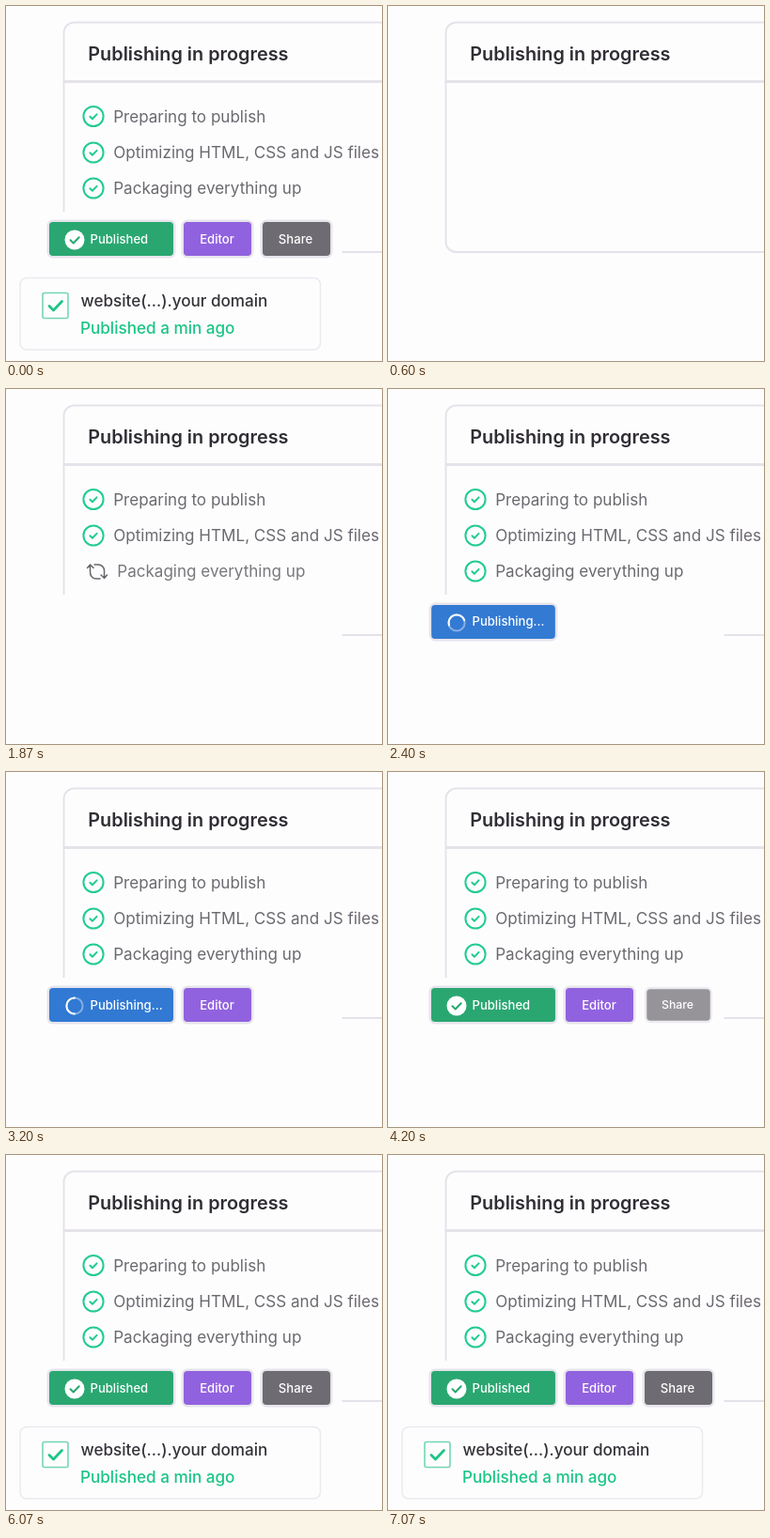
An HTML page that plays this animation: 400 px wide and 378 px high, repeating every 7.14 s.

```html
<!DOCTYPE html>
<html lang="en">
<head>
<meta charset="utf-8">
<title>Publishing in progress</title>
<style>
  html, body { margin: 0; width: 100%; height: 100%; overflow: hidden; background: #fefdfe; }
  svg { display: block; width: 400px; height: 378px; fill: none; font-family: Inter, "Open Sans", sans-serif; }
  path { stroke-linecap: round; stroke-linejoin: round; }
  .title { font-size: 19.85px; font-weight: 600; fill: #302e34; }
  .row text { font-size: 17.07px; fill: #6b696f; }
  .btn rect { stroke: #e6e5ec; stroke-width: 5; paint-order: stroke; }
  .btn text { font-size: 13.1px; font-weight: 500; fill: #fff; }
  .site text { font-size: 17.12px; font-weight: 500; fill: #353339; }
  .site .note { fill: #1bc586; }
</style>
</head>
<body>
<svg viewBox="0 0 400 378">
  <g stroke="#e5e3e9">
    <rect x="61.5" y="17.5" width="380" height="244.5" rx="11" stroke-width="2"/>
    <path d="M62 80.5H400" stroke-width="3"/>
  </g>
  <text class="title" x="87.3" y="58">Publishing in progress</text>

  <g id="rows"></g>
  <rect id="strip" x="32" y="219" width="325.5" height="57" fill="#fefdfe"/>

  <g id="publish" class="btn">
    <rect id="face" x="46" y="230" width="132" height="36" rx="4"/>
    <g id="busy">
      <g stroke="#fff" stroke-width="2">
        <circle cx="73" cy="249" r="8.6" stroke-opacity=".4"/>
        <path id="arc" d="M73 257.6A8.6 8.6 0 0 1 73 240.4"/>
      </g>
      <text x="89.5" y="252.5">Publishing...</text>
    </g>
    <g id="ready">
      <circle cx="73" cy="249" r="10.5" fill="#fff"/>
      <path d="M68.5 249.3l3.2 3.2 6-6.2" stroke="#2aa771" stroke-width="2"/>
      <text x="89.5" y="252.5">Published</text>
    </g>
  </g>
  <g id="editor" class="btn">
    <rect x="189" y="230" width="72" height="36" rx="4" fill="#9162df"/>
    <text x="224.5" y="252.5" text-anchor="middle">Editor</text>
  </g>
  <g id="share" class="btn">
    <rect x="273" y="230" width="72" height="36" rx="4" fill="#6e6b72"/>
    <text x="308" y="252.5" text-anchor="middle">Share</text>
  </g>

  <g id="site" class="site">
    <rect x="15" y="289.5" width="319.5" height="76.5" rx="7" fill="#fefdfe" stroke="#ebeaef" stroke-width="1.5"/>
    <rect x="39" y="305.5" width="27" height="27" rx="2" stroke="#72d8b0" stroke-width="1.6"/>
    <path d="M46 319.5l4.5 4.5 9-9.5" stroke="#1fc487" stroke-width="2.8"/>
    <text x="79.5" y="320">website(...).your domain</text>
    <text class="note" x="79" y="349">Published a min ago</text>
  </g>
</svg>
<script>
const LOOP = 7140, CLEAR = 70;
const $ = id => document.getElementById(id);

const rows = [
  { text: "Preparing to publish", y: 117.5, start: 650, done: 0 },
  { text: "Optimizing HTML, CSS and JS files", y: 156, start: 1120, done: 0 },
  { text: "Packaging everything up", y: 194, start: 1595, done: 2130 },
];

$("rows").innerHTML = rows.map(r => `<g class="row">
  <g transform="translate(93 ${r.y})">
    <g class="check" stroke="#22cc90" stroke-width="2">
      <circle r="10.6"/><path d="M-3.6 .3l2.5 2.5 4.7-4.9"/>
    </g>
    <g class="sync" stroke="#59575d" stroke-width="1.5">
      <path d="M-3 -7H1A6.5 6.5 0 0 1 7.5 -.5V7M4 4l3.5 3.5L10.5 4"/>
      <path d="M3 8H-1A6.5 6.5 0 0 1 -7.5 1V-6.5M-10.5 -3.5l3 -3.5L-4 -3.5"/>
    </g>
  </g>
  <text x="114.2" y="${r.y + 6}">${r.text}</text></g>`).join("");
[...$("rows").children].forEach((el, i) => rows[i].el = el);

// Ease-out: the part of the way still to go
const left = (t, start, dur) => (1 - Math.min(1, Math.max(0, (t - start) / dur))) ** 3;
const show = (el, on) => el.style.display = on ? "" : "none";

function place(el, rest, transform) {
  el.setAttribute("opacity", 1 - rest);
  el.setAttribute("transform", transform);
}

function pop(el, t, start, cx, cy, shrink = .22) {
  const rest = left(t, start, 400);
  place(el, rest, `translate(${cx} ${cy}) scale(${1 - shrink * rest}) translate(${-cx} ${-cy})`);
}

function draw(now) {
  let t = now % LOOP;
  if (t < CLEAR) t = LOOP;

  for (const r of rows) {
    const rest = left(t, r.start, 500);
    place(r.el, rest, `translate(${45 * rest} 0)`);
    show(r.el.querySelector(".check"), t >= r.done);
    show(r.el.querySelector(".sync"), t < r.done);
  }

  const rest = left(t, 920, 580);
  place($("strip"), rest, `translate(0 ${58 * rest})`);

  pop($("publish"), t, 2090, 112, 248);
  pop($("editor"), t, 2560, 225, 248);
  pop($("share"), t, 4065, 309, 248);
  pop($("site"), t, 4560, 175, 328, .1);

  const ready = t >= 3800;
  $("face").setAttribute("fill", ready ? "#2aa771" : "#3179d3");
  show($("ready"), ready);
  show($("busy"), !ready);
  $("arc").setAttribute("transform", `rotate(${(t - 3200) * .36} 73 249)`);
}

const begin = performance.now();
function tick() {
  draw(performance.now() - begin);
  requestAnimationFrame(tick);
}
tick();
</script>
</body>
</html>
```
